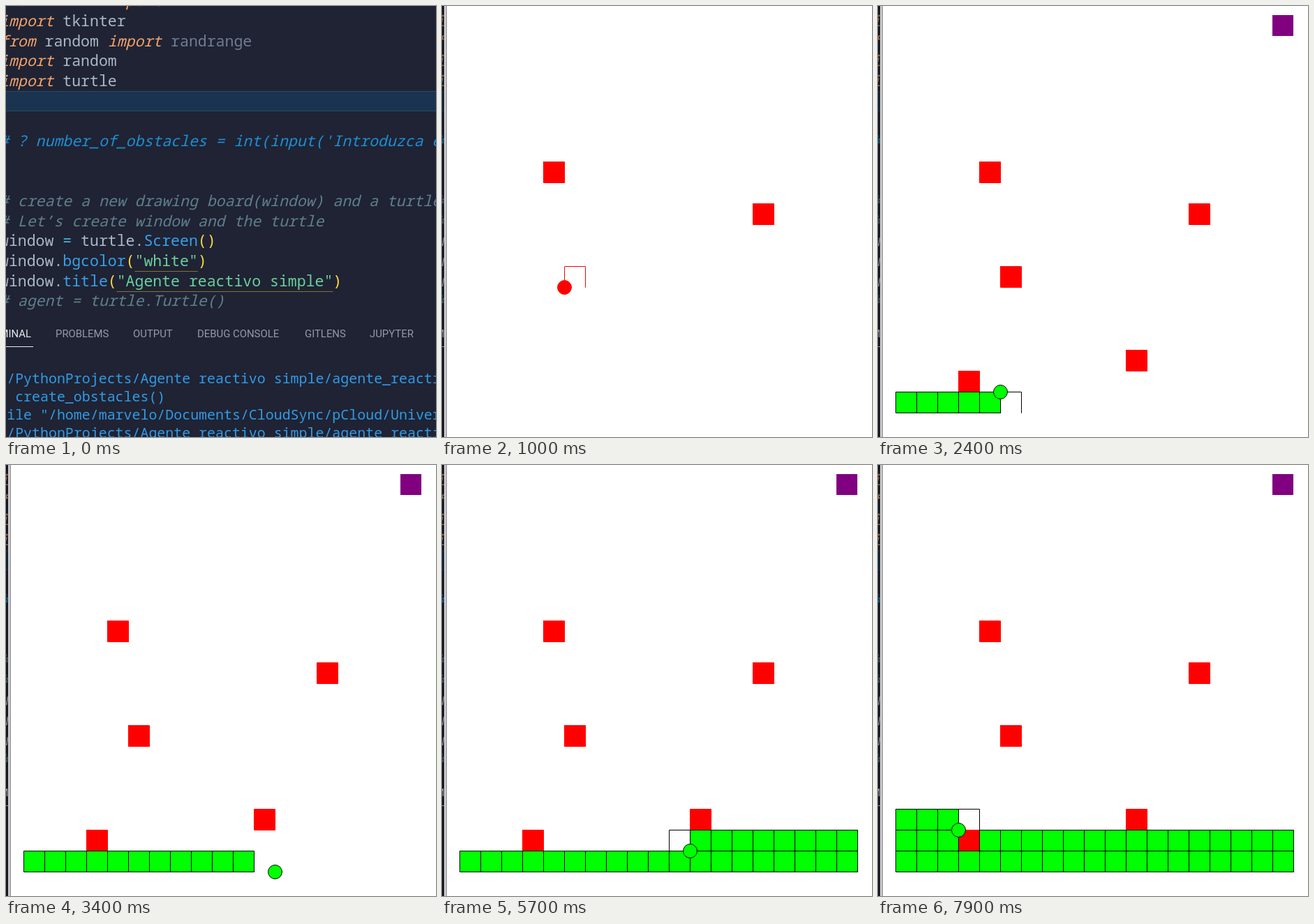
An HTML page with a canvas that plays this animation: 616 by 618 pixels, repeating every 8000 ms.

```html
<!DOCTYPE html>
<html lang="es">
<head>
<meta charset="utf-8">
<style>
  html, body { margin: 0; width: 100%; height: 100%; overflow: hidden; background: #fff; }
  canvas { display: block; }
</style>
</head>
<body>
<canvas id="stage" width="616" height="618"></canvas>
<script>
const ctx = document.getElementById('stage').getContext('2d');
const W = 616, H = 618, LOOP = 8000, CELL = 30;
const MONO = '"Noto Sans Mono", "DejaVu Sans Mono", monospace';

// --- Code editor ---
const C = {
  key: '#f4a269', text: '#abb8c7', dim: '#737c90', note: '#5f7f8b', query: '#1d8fd3',
  call: '#399fe6', op: '#45b5d8', paren: '#ffd93f', str: '#6bd09a', term: '#319be6'
};

// A line is a list of [colour, text, italic] runs.
const imports = name => [[C.key, 'import ', true], [C.text, name]];
const comment = (text, color = C.note) => [[color, text, true]];
const method = (name, arg) => [
  [C.text, 'window.'], [C.call, name], [C.paren, '('], [C.str, arg], [C.paren, ')']
];
const code = [
  [[C.key, 'from ', true], [C.text, 'turtle '], [C.key, 'import', true]],
  imports('tkinter'),
  [[C.key, 'from ', true], [C.text, 'random '], [C.key, 'import ', true], [C.dim, 'randrange']],
  imports('random'),
  imports('turtle'),
  [], [],
  comment("# ? number_of_obstacles = int(input('Introduzca el", C.query),
  [], [],
  comment('# create a new drawing board(window) and a turtle'),
  comment('# Let’s create window and the turtle'),
  [[C.text, 'window '], [C.op, '= '], [C.text, 'turtle.'], [C.call, 'Screen'], [C.paren, '()']],
  method('bgcolor', '"white"'),
  method('title', '"Agente reactivo simple"'),
  comment('# agent = turtle.Turtle()')
];
const tabs = [['PROBLEMS', 71], ['OUTPUT', 182], ['DEBUG CONSOLE', 274], ['GITLENS', 428], ['JUPYTER', 521]];
const path = '/PythonProjects/Agente reactivo simple/agente_reactivo';
const traceback = [path, ' create_obstacles()', 'ile "/home/marvelo/Documents/CloudSync/pCloud/Universidad', path];
const ending = [path, ' raise Terminator', 'turtle.Terminator', path];

function rect(color, x, y, w, h) {
  ctx.fillStyle = color;
  ctx.fillRect(x, y, w, h);
}

function write(text, x, y, color, font) {
  ctx.font = font;
  ctx.fillStyle = color;
  ctx.fillText(text, x, y);
}

function drawEditor(output) {
  rect('#1f2334', 0, 0, W, H);
  rect('#1a3350', 0, 122, W, 29);
  rect('#264d63', 0, 122, W, 1);
  rect('#264d63', 0, 150, W, 1);
  code.forEach((runs, row) => {
    let x = -9;
    const y = 0.4 + row * 28.67;
    for (const [color, text, italic] of runs) {
      const width = text.length * 12.9;
      write(text, x, y, color, (italic ? 'italic ' : '') + '21.5px ' + MONO);
      if (color === C.str) rect('#81752f', x, Math.round(y + 7), width, 1);
      x += width;
    }
  });

  const tabFont = '14.9px Roboto, sans-serif';
  ctx.textAlign = 'right';
  write('TERMINAL', 36, 475, '#e6e8ee', tabFont);
  ctx.textAlign = 'left';
  for (const [name, x] of tabs) write(name, x, 475, '#959aa7', tabFont);
  rect('#e6e8ee', 0, 488, 39, 1);
  output.forEach((line, i) => write(line, 1.2, 541 + i * 26, C.term, '19.93px ' + MONO));
}

// --- Turtle path: each cell is traced from its bottom right corner ---
const cells = [], poses = [];
const green = { ink: '#000', fill: '#0f0' };
const red = { ink: '#f00', fill: '#f00' };
const purple = { ink: '#800080', fill: '#800080', bare: true };

const pose = (x, y, style = green) => poses.push({ x, y, style });

function addCell(left, top, style = green) {
  const r = left + CELL, b = top + CELL;
  const corners = [[r, b], [r, top], [left, top], [left, b], [r, b]];
  cells.push({ left, top, style, corners, start: poses.length });
  for (const [x, y] of corners) pose(x, y, style);
}

for (const [x, y] of [[145, 223], [445, 283], [175, 373], [355, 493], [115, 523]]) addCell(x, y, red);
addCell(565, 13, purple);
for (let x = 25; x <= 565; x += CELL) addCell(x, 553);
pose(595, 583);
for (let x = 565; x >= 25; x -= CELL) {
  if (x === 115) {
    // walk around the obstacle
    pose(145, 553);
    pose(145, 583);
    pose(115, 583);
  } else addCell(x, 523);
}
pose(55, 553);
for (let x = 25; x <= 145; x += CELL) addCell(x, 493);

// [time, pose index]; the turtle pauses where two indices agree
const pace = [
  [600, 0], [1500, 30], [1700, 36], [2400, 57], [2900, 57], [3000, 77], [3200, 84],
  [3300, 84], [3400, 85], [4200, 112], [4600, 125], [5100, 145], [5700, 170],
  [6000, 179], [6900, 206], [7800, 235], [7900, 238]
];

function poseAt(time) {
  const i = pace.findIndex(([t]) => t >= time);
  const [t0, p0] = pace[i - 1], [t1, p1] = pace[i];
  return Math.round(p0 + (p1 - p0) * (time - t0) / (t1 - t0));
}

function drawTurtle(x, y, { ink, fill }) {
  ctx.beginPath();
  ctx.arc(x + 0.5, y + 0.5, 10, 0, Math.PI * 2);
  ctx.fillStyle = fill;
  ctx.fill();
  ctx.strokeStyle = ink;
  ctx.stroke();
}

function drawCell({ left, top, style, corners, start }, now) {
  if (now >= start + 5) rect(style.fill, left, top, CELL, CELL);
  if (style.bare || now <= start) return;
  ctx.beginPath();
  for (const [x, y] of corners.slice(0, now - start + 1)) ctx.lineTo(x + 0.5, y + 0.5);
  ctx.strokeStyle = style.ink;
  ctx.stroke();
}

function drawWindowEdge() {
  ctx.save();
  ctx.beginPath();
  ctx.rect(0, 0, 3, H);
  ctx.clip();
  drawEditor([]);
  rect('rgba(0,0,0,.35)', 0, 0, 3, H);
  ctx.restore();
  rect('#c9c7c9', 3, 0, 3, H);
  rect('#8e8c90', 6, 0, 1, H);
}

function draw(time) {
  if (time < 400) return drawEditor(time < 200 ? traceback : ending);
  rect('#fff', 0, 0, W, H);
  const black = { ink: '#000', fill: '#000' };
  if (time < 500) return drawTurtle(455, 313, black);
  drawWindowEdge();
  if (time < 700) return drawTurtle(310, 298, black);
  const now = poseAt(time);
  for (const cell of cells) drawCell(cell, now);
  const { x, y, style } = poses[now];
  drawTurtle(x, y, style);
}

ctx.lineWidth = 1;
ctx.lineCap = 'square';
const begin = performance.now();
function tick() {
  const t = (performance.now() - begin) % LOOP;
  draw(Math.floor(t / 100) * 100);
  requestAnimationFrame(tick);
}
tick();
</script>
</body>
</html>
```
